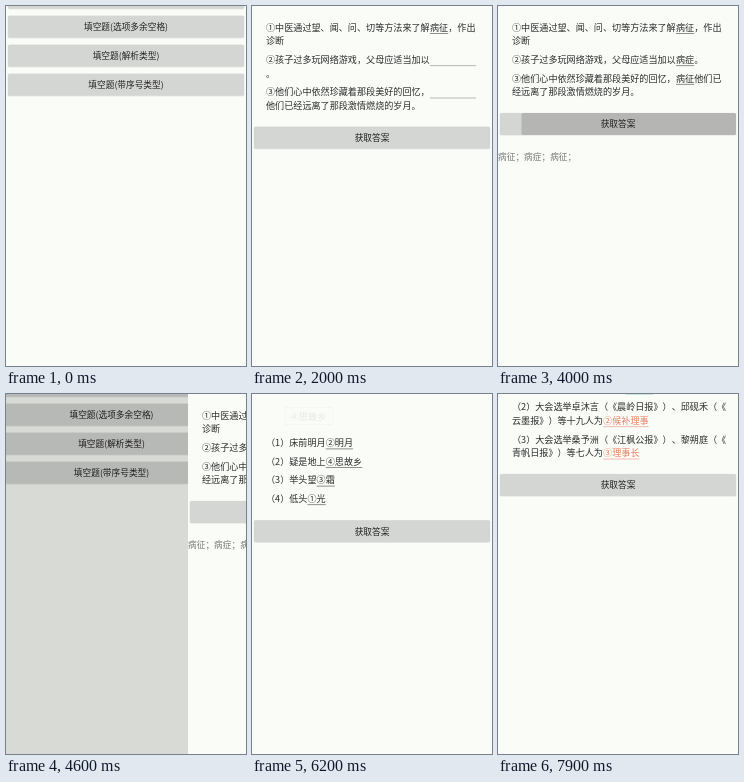
Write an HTML page that moves like this. It is 240 px wide and 360 px high and loops after 8000 ms.

```html
<!DOCTYPE html>
<html lang="zh-CN">
<head>
<meta charset="utf-8">
<title>填空题</title>
<style>
  html, body { margin: 0; width: 100%; height: 100%; overflow: hidden; background: #fafcf8; }
  svg { display: block; width: 100vw; height: 100vh; }
  text {
    font-family: "Noto Sans CJK SC", "Noto Sans CJK", "Noto Sans CJK JP", sans-serif;
    text-spacing-trim: space-all;
    white-space: pre;
  }
</style>
</head>
<body>
<svg id="stage" viewBox="0 0 240 360"></svg>
<script>
const LOOP = 8000, STEP = 100;
const BODY = 9.11, SMALL = 8.7, BLANK = 46, LEFT = 14;
const LINE = 13.7, PARAGRAPH = 18.6;
const PAPER = '#fafcf8', INK = '#2b2d2b', RED = '#e97f66', TEAL = '#b4ddcc';

const rect = (x, y, w, h, fill, extra = '') =>
  `<rect x="${x}" y="${y}" width="${w}" height="${h}" fill="${fill}" ${extra}/>`;

// y is the optical middle of the glyphs
const label = (x, y, str, size = BODY, fill = INK, anchor = 'start') =>
  `<text x="${x}" y="${y + size * .38}" font-size="${size}" fill="${fill}" text-anchor="${anchor}">${str}</text>`;

const widthOf = str =>
  [...str].reduce((sum, c) => sum + (/\d/.test(c) ? .555 : 1), 0) * BODY;

const blank = active => ({ str: '', color: active ? '#777' : '#a3a5a3' });
const answer = (str, color = INK) => ({ str, color });

// Plain strings are running text, objects are underlined answers or blanks
function line(y, ...parts) {
  let x = LEFT, out = '';
  for (const part of parts) {
    const { str, color } = part.color ? part : { str: part, color: '' };
    const w = color && !str ? BLANK : widthOf(str);
    if (str) out += label(x, y, str, BODY, color || INK);
    if (color) out += rect(x, y + 5.8, w, .8, color, str ? 'opacity=".65"' : '');
    x += w;
  }
  return out;
}

function button(y, str, press) {
  let out = rect(1.5, y - .3, 237, 23, '#e9ebe7', 'rx="2"') +
            rect(2, y, 236, 22, '#d4d6d3', 'rx="1.5"');
  if (press) {
    const { from, strength } = press;
    out += rect(from, y, 238 - from, 22, '#000', `rx="1.5" opacity="${strength}"`);
  }
  return out + label(120, y + 11, str, SMALL, '#222', 'middle');
}

const FULL = { from: 2, strength: .16 };
const RIPPLES = [
  { row: 0, start: 1000, end: 1400, press: FULL },
  { row: 'answer', start: 4000, end: 4100, press: { from: 23.5, strength: .15 } },
  { row: 'answer', start: 4100, end: 4200, press: FULL },
  { row: 1, start: 4800, end: 5300, press: FULL },
  { row: 2, start: 7300, end: 7400, press: { from: 93, strength: .06 } },
  { row: 2, start: 7400, end: 7500, press: { from: 40, strength: .11 } },
  { row: 2, start: 7500, end: 8000, press: FULL },
];
const pressOf = (row, t) =>
  RIPPLES.find(r => r.row === row && t >= r.start && t < r.end)?.press;

const ROWS = ['', '填空题(选项多余空格)', '填空题(解析类型)', '填空题(带序号类型)'];
const listPage = t => rect(0, 0, 300, 360, PAPER) +
  ROWS.map((str, i) => button(-19.3 + i * 29, str, pressOf(i, t))).join('');

function medicinePage(t) {
  const first = t >= 1700, second = t >= 2500, third = t >= 3600;
  const y1 = 21.2;
  const y2 = y1 + LINE + PARAGRAPH;
  const y3 = y2 + PARAGRAPH + (second ? 0 : LINE);
  const lead = '①中医通过望、闻、问、切等方法来了解';
  const middle = '②孩子过多玩网络游戏，父母应适当加以';
  const last = '③他们心中依然珍藏着那段美好的回忆，';
  return (first
      ? line(y1, lead, answer('病征'), '，作出') + line(y1 + LINE, '诊断')
      : line(y1, lead, blank(t >= 1500)) + line(y1 + LINE, '，作出诊断')) +
    (second
      ? line(y2, middle, answer('病症'), '。')
      : line(y2, middle, blank(t >= 2400)) + line(y2 + LINE, '。')) +
    (third
      ? line(y3, last, answer('病征'), '他们已') + line(y3 + LINE, '经远离了那段激情燃烧的岁月。')
      : line(y3, last, blank(t >= 3000)) + line(y3 + LINE, '他们已经远离了那段激情燃烧的岁月。')) +
    button(second ? 107 : 120.7, '获取答案', pressOf('answer', t)) +
    (t >= 4000 ? label(0, 150.7, '病征；病症；病征；', SMALL, '#777977') : '');
}

const VERSES = [
  { lead: '（1）床前明月', fill: '②明月', at: 5400 },
  { lead: '（2）疑是地上', fill: '④思故乡', at: 5700 },
  { lead: '（3）举头望', fill: '③霜', at: 6000 },
  { lead: '（4）低头', fill: '①光', at: 6200 },
];
function poemPage(t) {
  const used = t >= 5700;
  const chip = (used ? rect(33.5, 13.5, 47, 17, 'none', 'stroke="#f3f5f1" stroke-width=".8"') : '') +
    label(38, 22.3, '④思故乡', BODY, used ? '#e6e8e4' : INK);
  return chip + VERSES.map(({ lead, fill, at }, i) =>
    line(48.7 + i * PARAGRAPH, lead, t >= at ? answer(fill) : blank(true))).join('') +
    button(126.3, '获取答案');
}

const meetingPage = () =>
  rect(128, 0, 27, .7, TEAL) +
  line(12.8, '（2）大会选举卓沐言（《晨岭日报》）、邱砚禾（《') +
  line(12.8 + LINE, '云墨报》）等十九人为', answer('②候补理事', RED)) +
  line(45.1, '（3）大会选举桑予洲（《江枫公报》）、黎朔庭（《') +
  line(45.1 + LINE, '青帆日报》）等七人为', answer('③理事长', RED)) +
  button(80, '获取答案');

const VISITS = [
  { page: medicinePage, open: 1000, close: 4500 },
  { page: poemPage, open: 4900, close: 6700 },
  { page: meetingPage, open: 7600, close: Infinity },
];

function slide(age) {
  const u = Math.min(1, Math.max(0, (age + 32) / 350));
  return 1 - (1 - u) ** 3;
}

function scene(t) {
  const visit = VISITS.findLast(v => t >= v.open);
  const p = visit ? slide(t - visit.open) - slide(t - visit.close) : 0;
  let out = `<g transform="translate(${-60 * p})">${listPage(t)}</g>`;
  if (p > .001) {
    const x = p > .999 ? 0 : 240 * (1 - p);
    out += rect(0, 0, 240, 360, '#000', `opacity="${.56 * p}"`) +
      `<g transform="translate(${x})">${rect(0, 0, 240, 360, PAPER)}${visit.page(t)}</g>`;
  }
  return out;
}

const stage = document.getElementById('stage');
const start = performance.now();
let shown = -1;
function tick() {
  const elapsed = (performance.now() - start) % LOOP;
  const t = Math.floor(elapsed / STEP) * STEP;
  if (t !== shown) stage.innerHTML = scene(shown = t);
  requestAnimationFrame(tick);
}
tick();
</script>
</body>
</html>
```
